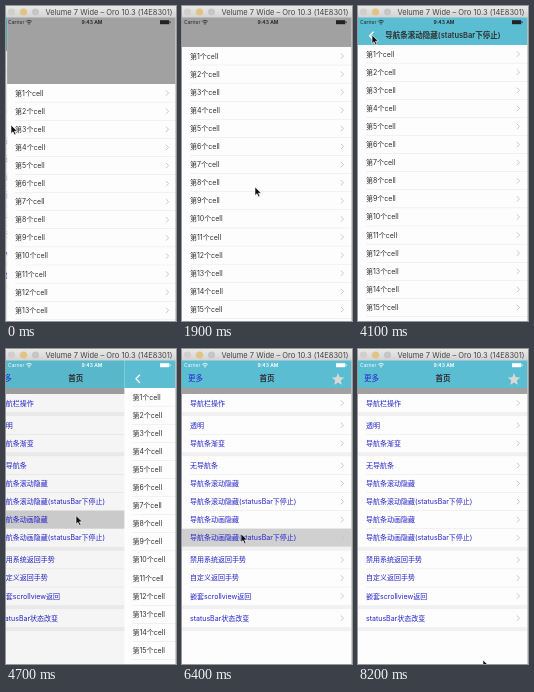
Animation of 170 by 315 pixels, one loop 8.3 s. Source, as an HTML page:

```html
<!DOCTYPE html>
<html lang="en">
<head>
<meta charset="utf-8">
<style>
html, body { margin: 0; width: 100%; height: 100%; overflow: hidden; background: #fff; }
svg { display: block; width: 170px; height: 315px; }
text { font-family: Inter, "Noto Sans CJK SC", "Noto Sans CJK", sans-serif; }
</style>
</head>
<body>
<svg id="stage" viewBox="0 0 170 315" xmlns="http://www.w3.org/2000/svg"></svg>
<script>
const LOOP = 8300, STEP = 100, W = 170, H = 315;
const TOP = 11, BAR = 39, ROW = 18.1;
const CYAN = '#5bbdd1', GRAY = '#a1a1a1', INK = '#303030', BLUE = '#2424cc';
const stage = document.getElementById('stage');

function el(parent, tag, attrs = {}, content) {
  const node = document.createElementNS('http://www.w3.org/2000/svg', tag);
  for (const k in attrs) node.setAttribute(k, attrs[k]);
  if (content) node.textContent = content;
  parent.appendChild(node);
  return node;
}
const group = parent => el(parent, 'g');
const rect = (p, x, y, width, height, fill) => el(p, 'rect', { x, y, width, height, fill });
const label = (p, x, cy, size, fill, str, extra = {}) =>
  el(p, 'text', { x, y: cy + size * 0.36, 'font-size': size, fill, ...extra }, str);
const line = (p, d, stroke, width) =>
  el(p, 'path', { d, stroke, 'stroke-width': width, fill: 'none' });
const move = (node, x, y) => node.setAttribute('transform', `translate(${x} ${y})`);
const show = (node, on) => node.setAttribute('visibility', on ? 'visible' : 'hidden');
const middle = { 'text-anchor': 'middle' };

function cell(p, y, str, color) {
  label(p, 8, y + ROW / 2, 7, color, str);
  line(p, `M158.8 ${y + 6.4}l2.7 2.7l-2.7 2.7`, '#c2c2c6', 0.9);
}
const divider = (p, y) => rect(p, 8, y - 0.2, W - 8, 0.4, '#dedede');

function navBar(p, title) {
  const bar = group(p);
  rect(bar, 0, TOP - 2, W, BAR - TOP + 2, CYAN);
  const items = group(bar);
  label(items, 85, 29.5, 7.5, INK, title, { ...middle, 'font-weight': 600 });
  return { bar, items };
}

// Home page
const sections = [
  ['导航栏操作'],
  ['透明', '导航条渐变'],
  ['无导航条', '导航条滚动隐藏', '导航条滚动隐藏(statusBar下停止)',
    '导航条动画隐藏', '导航条动画隐藏(statusBar下停止)'],
  ['禁用系统返回手势', '自定义返回手势', '嵌套scrollview返回'],
  ['statusBar状态改变']
];
const home = group(stage), rowY = {};
rect(home, 0, 0, W, H, '#fdfdfd');
rect(home, 0, BAR, W, 6, GRAY);
const press = rect(home, 0, 0, W, ROW, '#d0d0d0');
let y = 45;
for (const names of sections) {
  names.forEach((name, i) => {
    if (i) divider(home, y);
    rowY[name] = y;
    cell(home, y, name, BLUE);
    y += ROW;
  });
  rect(home, 0, y, W, 4, '#f1f1f2');
  y += 4;
}
const homeItems = navBar(home, '首页').items;
label(homeItems, 6, 29.5, 7.5, BLUE, '更多');
const star = Array.from({ length: 10 }, (_, i) => {
  const r = i % 2 ? 2.9 : 6.4, a = i * Math.PI / 5;
  return `${156 + r * Math.sin(a)},${30.5 - r * Math.cos(a)}`;
}).join(' ');
el(homeItems, 'polygon', { points: star, fill: '#d9d9d6' });
const shade = rect(home, 0, 0, W, H, '#000');

// Each page is tapped, pushed, dragged up and back by `drag` pixels, then popped.
const pages = [
  { name: '无导航条', top: 78, push: -900, pop: -20, drag: 0 },
  { name: '导航条滚动隐藏', top: 78, push: 650, pop: 2250, drag: 85, x: 73, y: 218, tapX: 73 },
  { name: '导航条滚动隐藏(statusBar下停止)', top: BAR, push: 2880, pop: 4150, drag: 60, x: 95, y: 190, tapX: 101, stop: true },
  { name: '导航条动画隐藏', top: BAR, push: 4650, pop: 5950, drag: 27, x: 27, y: 64, tapX: 70 },
  { name: '导航条动画隐藏(statusBar下停止)', top: BAR, push: 6440, pop: 7700, drag: 60, x: 75, y: 190, tapX: 59, stop: true }
];
const cursorPath = [[0, 5, 119]];
for (const p of pages) {
  p.root = group(stage);
  rect(p.root, 0, 0, W, H, '#fdfdfd');
  p.list = group(p.root);
  if (p.top > BAR) rect(p.list, 0, -140, W, 140, GRAY);
  for (let i = 0; i < 24; i++) {
    cell(p.list, i * ROW, `第${i + 1}个cell`, INK);
    divider(p.list, (i + 1) * ROW);
  }
  p.begin = p.push + 350;
  p.end = p.pop - 200;
  if (!p.drag) continue;
  Object.assign(p, navBar(p.root, p.name));
  line(p.items, 'M15.6 25.6l-4 4.2l4 4.2', '#fff', 1.3);
  const tapY = rowY[p.name] + 5;
  cursorPath.push(
    [p.push - 80, p.tapX, tapY], [p.push + 60, p.tapX, tapY],
    [p.begin, p.x, p.y], [p.end, p.x, p.y],
    [p.pop - 50, 14, 29], [p.pop + 100, 14, 29]);
}
cursorPath.push([8200, 125, 311]);

// Status bar
const status = group(stage);
label(status, 2, 16.3, 5, 'currentColor', 'Carrier');
line(status, 'M20.2 15.4q2.8-2.4 5.6 0M21.4 16.7q1.6-1.3 3.2 0', 'currentColor', 0.8);
el(status, 'circle', { cx: 23, cy: 17.9, r: 0.7, fill: 'currentColor' });
label(status, 86, 16.3, 5, 'currentColor', '9:43 AM', { ...middle, 'font-weight': 600 });
rect(status, 154, 14.2, 9.2, 4, 'currentColor');
rect(status, 163.7, 15.3, 0.8, 1.8, 'currentColor');
rect(stage, 169.2, TOP, 0.8, H, '#c4c4c4');

// Window title bar
const fade = el(el(stage, 'defs'), 'linearGradient', { id: 'chrome', x2: 0, y2: 1 });
el(fade, 'stop', { offset: 0, 'stop-color': '#e9e9e9' });
el(fade, 'stop', { offset: 1, 'stop-color': '#d3d3d3' });
rect(stage, 0, 0, W, TOP + 0.5, 'url(#chrome)');
['#d2cecd', '#e2c384', '#c6c6c6'].forEach((fill, i) =>
  el(stage, 'circle', { cx: 5.5 + i * 12, cy: 6, r: 3.6, fill }));
label(stage, 103, 6.2, 7.5, '#444', 'Velume 7 Wide – Oro 10.3 (14E8301)', middle);

const cursor = el(stage, 'path', {
  d: 'M0 0v8.6l2-1.8l1.5 3.2l1.5-.7l-1.5-3.1h2.8z',
  fill: '#111', stroke: '#fff', 'stroke-width': 0.6
});

const clamp = v => Math.max(0, Math.min(1, v));
const smooth = p => p * p * (3 - 2 * p);
// Rises, rests in the middle, falls back.
const bump = u => smooth(clamp(1.6 - 3.2 * Math.abs(u - 0.5)));

function pathAt(keys, t) {
  const i = keys.findIndex(k => k[0] > t);
  if (i < 0) return keys[keys.length - 1].slice(1);
  const [t0, x0, y0] = keys[i - 1], [t1, x1, y1] = keys[i];
  const k = smooth((t - t0) / (t1 - t0));
  return [x0 + (x1 - x0) * k, y0 + (y1 - y0) * k];
}

const pageX = (p, t) => t < p.pop
  ? W * (1 - clamp((t - p.push) / 440)) ** 3
  : W * smooth(clamp((t - p.pop) / 420));

function draw(t) {
  let front = W, drag = 0;
  for (const p of pages) {
    const x = pageX(p, t);
    show(p.root, x < W);
    if (x >= W) continue;
    front = x;
    const scroll = p.drag * bump((t - p.begin) / (p.end - p.begin));
    drag = scroll;
    move(p.root, x, 0);
    move(p.list, 0, p.top - scroll);
    if (!p.bar) continue;
    const travel = p.stop ? 18 : 28;
    const hide = clamp(scroll / (travel - 1));
    move(p.bar, 0, -hide * travel);
    p.items.setAttribute('opacity', 1 - hide);
  }
  const cover = 1 - front / W;
  move(home, -50 * cover, 0);
  shade.setAttribute('opacity', 0.1 * cover);

  const pressed = pages.find(p => t >= p.push - 60 && t < p.push + 440);
  show(press, pressed);
  if (pressed) press.setAttribute('y', rowY[pressed.name]);

  status.setAttribute('color', front < W / 2 ? '#222' : '#fff');
  const [cx, cy] = pathAt(cursorPath, t);
  move(cursor, cx, cy - drag);
}

const start = performance.now();
function tick() {
  const t = (performance.now() - start) % LOOP;
  draw(Math.floor(t / STEP) * STEP);
  requestAnimationFrame(tick);
}
draw(0);
requestAnimationFrame(tick);
</script>
</body>
</html>
```
